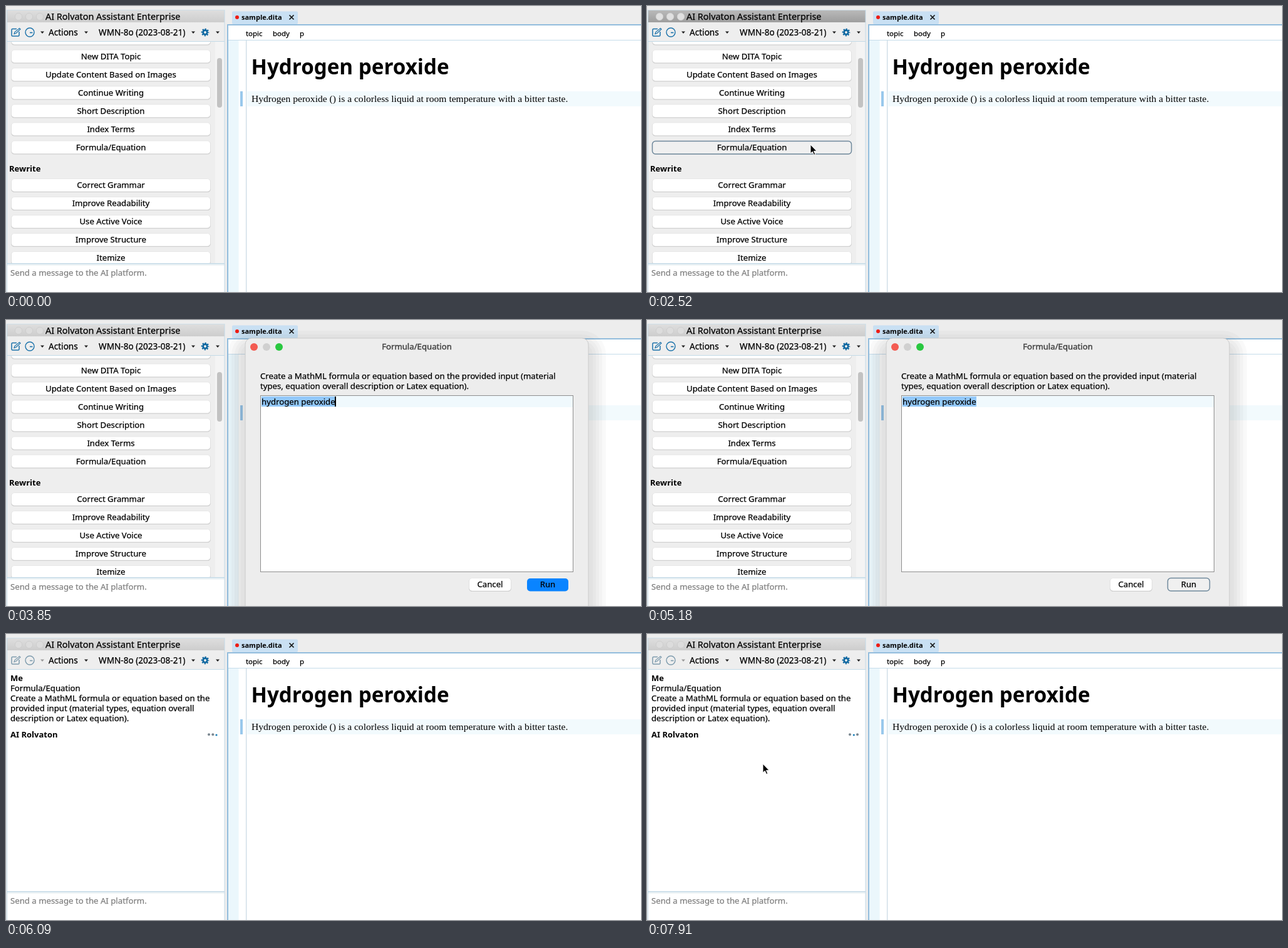
Write an HTML page that moves like this. It is 1014 px wide and 456 px high and loops after 8000 ms.

```html
<!DOCTYPE html>
<html lang="en">
<head>
<meta charset="utf-8">
<title>Formula assistant</title>
<style>
  html, body { margin: 0; height: 100%; overflow: hidden; background: #ededed; }
  svg { display: block; width: 1014px; height: 456px; font: 13.2px "Noto Sans", "Open Sans", sans-serif; }
  text { white-space: pre; fill: var(--ink, #000); stroke: var(--ink, #000); stroke-width: .25px; }
  text[font-weight], .serif { stroke: none; }
</style>
</head>
<body>
<svg id="stage" viewBox="0 0 1014 456"></svg>
<script>
const LOOP = 8000;
const stage = document.getElementById('stage');

const rect = (x, y, w, h, fill, extra = '') =>
  `<rect x="${x}" y="${y}" width="${w}" height="${h}" fill="${fill}" ${extra}/>`;
const circle = (x, y, r, fill, extra = '') =>
  `<circle cx="${x}" cy="${y}" r="${r}" fill="${fill}" ${extra}/>`;
const path = (d, stroke, width, extra = '') =>
  `<path d="${d}" fill="none" stroke="${stroke}" stroke-width="${width}" ${extra}/>`;
const text = (x, y, s, extra = '') => `<text x="${x}" y="${y}" ${extra}>${s}</text>`;
const group = (id, body, extra = '') => `<g id="${id}" ${extra}>${body}</g>`;
const arrow = (x, fill = '#222') => `<path d="M${x - 3} 40.5h6l-3 3.5z" fill="${fill}"/>`;
const bold = 'font-weight="700"', middle = 'text-anchor="middle"';

const button = (x, y, w, label) =>
  rect(x, y - 9.5, w, 21, '#c9c9c9', 'rx="5.5"') +
  rect(x + .5, y - 10, w - 1, 20.5, '#fff', 'rx="5" stroke="#dedede" stroke-width=".6"') +
  text(x + w / 2, y + 4.6, label, middle);
const pressed = (x, y, w, label) =>
  rect(x, y - 10, w, 20.5, '#f0f0f0', 'rx="5" stroke="#6f899c" stroke-width="1.5"') +
  text(x + w / 2, y + 4.6, label, middle);

const titleBar = (fill, dot, ring) =>
  rect(2, 7, 347, 19, fill) +
  [20, 37, 54].map(x => circle(x, 17, 5.7, dot, `stroke="${ring}" stroke-width=".8"`)).join('');

const toolIcons = (blue, dark) =>
  path('M17 36.5H10.5Q9 36.5 9 38V46.5Q9 48 10.5 48H19.5Q21 48 21 46.5V41', blue, 1.5) +
  path('M13 44.5l1-3 7.5-6 1.5 1.5-7 6.5z', blue, 1.2) +
  circle(38, 42, 7, 'none', `stroke="${blue}" stroke-width="1.4"`) +
  path('M38 42.5h4.5', blue, 1.6) + arrow(58, dark);

const gear = circle(318, 42, 3.3, 'none', 'stroke="#0c66a0" stroke-width="2.7"') +
  circle(318, 42, 5.3, 'none', 'stroke="#0c66a0" stroke-width="2" stroke-dasharray="2.2 1.963" stroke-dashoffset="1.1"');

const lines = (x, y, list) => list.map((s, i) => text(x, y + 16 * i, s)).join('');

const defs = `<defs>
  <linearGradient id="idle" x2="0" y2="1"><stop stop-color="#dedede"/><stop offset="1" stop-color="#cdcdcd"/></linearGradient>
  <linearGradient id="busy" x2="0" y2="1"><stop stop-color="#b9b9b9"/><stop offset="1" stop-color="#9e9e9e"/></linearGradient>
  <clipPath id="list"><rect x="2" y="57" width="347" height="353"/></clipPath>
</defs>`;

const editor =
  rect(354, 30, 660, 426, '#fff') +
  rect(361, 8.5, 105, 20.5, '#c9e0f3', 'rx="2"') +
  circle(369, 18, 3, '#ee1c14') +
  text(376, 22, 'sample.dita', bold + ' font-size="11"') +
  path('M452.5 14.5l7 7m0-7l-7 7', '#111', 1.7) +
  rect(355, 55, 16.5, 401, '#ebf7fc') +
  rect(383, 55, 1.3, 401, '#ccdbe5') +
  rect(355, 54, 659, 1, '#c6dcea') +
  rect(353, 29, 661, 2, '#93bddd') +
  rect(353, 29, 2, 427, '#93bddd') +
  [[383, 'topic'], [426, 'body'], [469, 'p']]
    .map(([x, s]) => text(x, 48, s, 'font-size="11.4"')).join('') +
  rect(384, 136, 630, 24, '#f2fafd') +
  rect(374, 136, 4, 24, '#99c8ec') +
  text(391.5, 109, 'Hydrogen peroxide', bold + ' font-size="33.2"') +
  text(392, 153, 'Hydrogen peroxide () is a colorless liquid at room temperature with a bitter taste.',
    `class="serif" font-size="15.58" font-family="'Liberation Serif', 'Times New Roman', serif"`) +
  group('editCaret', rect(523, 138, 2, 20, '#000'));

const actions = ['New DITA Topic', 'Update Content Based on Images', 'Continue Writing',
  'Short Description', 'Index Terms', 'Formula/Equation'];
const rewrites = ['Correct Grammar', 'Improve Readability', 'Use Active Voice',
  'Improve Structure', 'Itemize'];
const column = (y, list) => list.map((s, i) => button(8, y + 29 * i, 319, s)).join('');

const panel =
  rect(2, 27, 347, 383, '#eee') +
  group('titleIdle', titleBar('url(#idle)', '#dcdcdc', '#cbcbcb')) +
  group('titleBusy', titleBar('url(#busy)', '#e0e0e0', '#d2d2d2')) +
  text(63, 22, 'AI Rolvaton Assistant Enterprise', 'font-size="14.4"') +
  group('toolsOn', toolIcons('#1b72aa', '#222')) +
  group('toolsOff', toolIcons('#7d9bad', '#999')) +
  text(68, 47, 'Actions', 'font-size="13.6"') + arrow(128) +
  text(148, 47, 'WMN-8o (2023-08-21)', 'font-size="13.6"') + arrow(299) +
  gear + arrow(338) +
  group('buttons',
    rect(334, 57, 15, 353, '#f4f4f4') +
    rect(337, 83, 8, 79, '#c2c2c2', 'rx="4"') +
    column(51, ['', ...actions]) +
    group('formulaDown', pressed(8.5, 225.5, 318, 'Formula/Equation')) +
    text(5, 264, 'Rewrite', bold + ' font-size="13"') +
    column(285.5, rewrites), 'clip-path="url(#list)"') +
  group('blank', rect(2, 57, 347, 353, '#fff')) +
  group('chat',
    text(7, 75, 'Me', bold + ' font-size="13"') +
    lines(7, 91, ['Formula/Equation', 'Create a MathML formula or equation based on the',
      'provided input (material types, equation overall', 'description or Latex equation).']) +
    text(7, 165, 'AI Rolvaton', bold + ' font-size="13"') +
    [324, 330.3, 336].map(x => circle(x, 160.5, 2, '#7b8790', 'class="dot"')).join('')) +
  rect(2, 56, 347, 1, '#c3dae7') +
  rect(2, 410, 347, 3.5, '#e4eef3') +
  rect(2, 410, 347, 1, '#bfd7e5') +
  rect(2, 413.5, 347, 43, '#fff') +
  text(7, 430, 'Send a message to the AI platform.', 'style="--ink:#808080"') +
  rect(1, 6, 1, 450, '#c3dae7') + rect(348.5, 6, 1, 450, '#c3dae7') +
  rect(1, 6, 348, 1, '#cfdfe8');

// Banded drop shadow: stacked translucent frames of growing spread.
const shadow = [7, 12, 17, 22, 28]
  .map(m => rect(382 - m, 45 - m, 548 + 2 * m, 500, '#000', `rx="${10 + m}" opacity=".022"`)).join('');

const dialog =
  shadow +
  rect(382, 29, 548, 440, '#ededed', 'rx="10" stroke="#c4c4c4" stroke-width=".8"') +
  circle(396, 43, 6, '#f35b52') + circle(416, 43, 6, '#d0d0d0') + circle(436, 43, 6, '#29c840') +
  text(656, 47, 'Formula/Equation', middle + ' style="--ink:#444;stroke-width:.45px"') +
  lines(406, 94, ['Create a MathML formula or equation based on the provided input (material',
    'types, equation overall description or Latex equation).']) +
  rect(406.5, 120.5, 499, 281, '#fff', 'stroke="#8e8e8e"') +
  rect(407, 121, 498, 18, '#f0f9fd') +
  rect(408, 122, 118, 16, '#92c8fa') +
  text(408, 135, 'hydrogen peroxide') +
  group('inputCaret', rect(525, 122, 2, 16, '#000')) +
  button(739, 421.5, 68, 'Cancel') +
  group('runUp', rect(832, 412, 66, 20.5, '#0a84ff', 'rx="5"') + text(865, 426, 'Run', middle)) +
  group('runDown', pressed(831.5, 421.5, 67, 'Run'));

const pointer = '<path d="M0 0V14.2L3.3 11.2 5.6 16.5 7.8 15.5 5.5 10.4H10z" fill="#000" stroke="#fff"/>';

stage.innerHTML = defs + rect(0, 0, 1014, 456, '#ededed') + panel + editor +
  group('dialog', dialog) +
  group('beam', path('M527.5 149.5q3 0 3 2v13q0 2-3 2m6-17q-3 0-3 2m0 13q0 2 3 2', '#222', 1)) +
  group('pointer', pointer);

const el = id => document.getElementById(id);
const show = (id, on) => el(id).style.display = on ? '' : 'none';
const dots = [...stage.querySelectorAll('.dot')];

function pointerAt(t) {
  if (t >= 2380 && t < 3640) return [261, 221];
  if (t < 6230) return null;
  const p = Math.min(1, Math.max(0, (t - 6300) / 420));
  const e = p * p * (3 - 2 * p);
  return [855 - 670 * e, 419 - 212 * e];
}

function draw(t) {
  const within = (a, b) => t >= a && t < b;
  show('editCaret', within(700, 1260) || within(1750, 2310));
  show('beam', within(1120, 1400));
  show('titleBusy', within(2520, 2800));
  show('titleIdle', !within(2520, 2800));
  show('formulaDown', within(2520, 2800));

  show('dialog', within(2800, 5250));
  show('inputCaret', within(2800, 3290) || within(3850, 4410) || within(4900, 5180));
  show('runUp', t < 5180);
  show('runDown', t >= 5180);

  const sent = t >= 5250;
  show('buttons', !sent);
  show('blank', sent);
  show('toolsOn', !sent);
  show('toolsOff', sent);
  show('chat', t >= 5390);

  const active = (Math.floor((t - 6080) / 106.5) + 62) % 3;
  dots.forEach((dot, i) => {
    const on = i === active;
    dot.setAttribute('r', on ? 1.6 : 2);
    dot.setAttribute('cy', on ? 161 : 160.3);
    dot.setAttribute('fill', on ? '#1b7fb8' : '#7b8790');
  });

  const at = pointerAt(t);
  show('pointer', at);
  if (at) el('pointer').setAttribute('transform', `translate(${at})`);
}

const start = performance.now();
function tick() {
  draw((performance.now() - start) % LOOP);
  requestAnimationFrame(tick);
}
tick();
</script>
</body>
</html>
```
